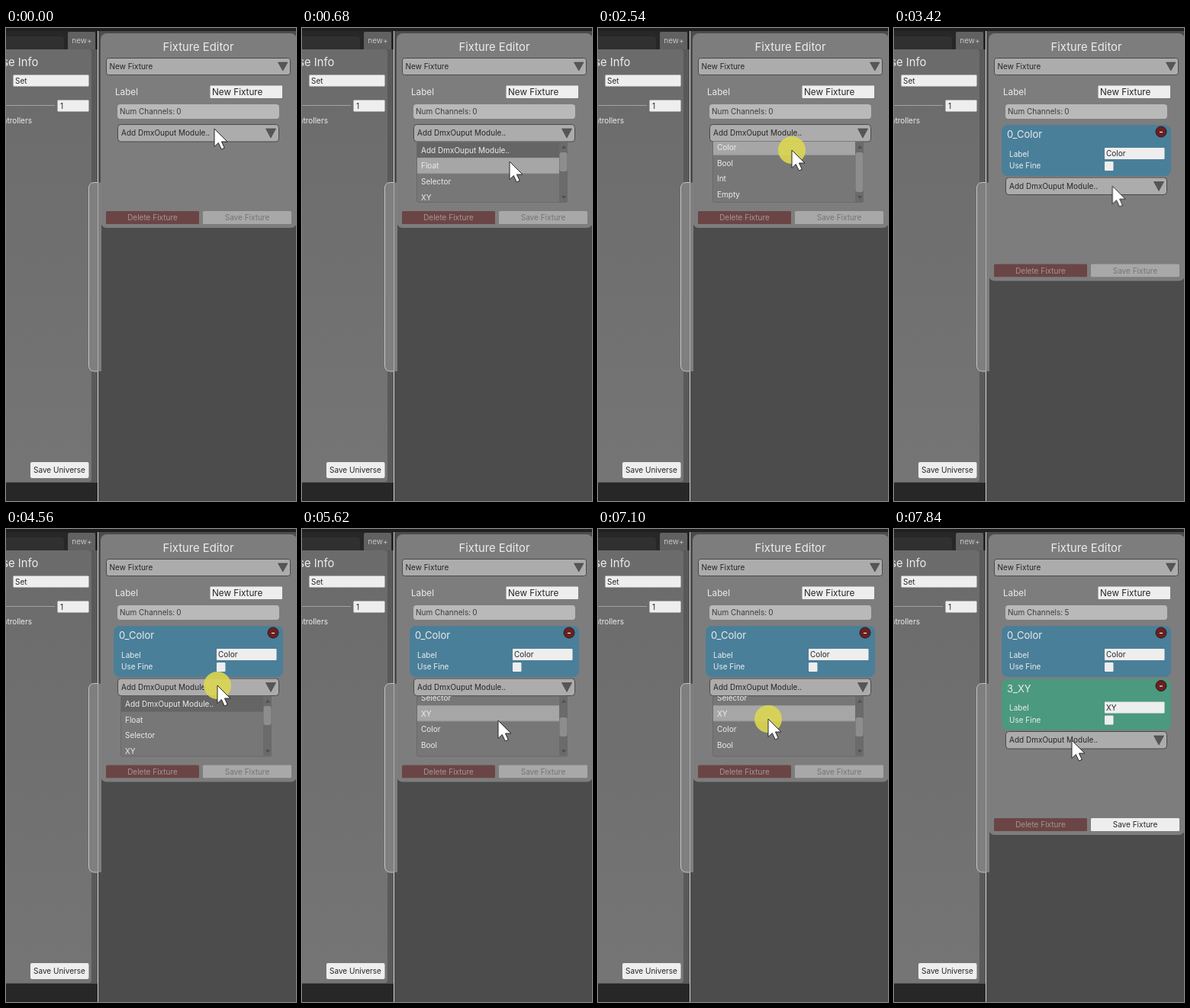
An HTML page that plays this animation: 380x620 px, repeating every 8 s.

```html
<!DOCTYPE html>
<html lang="en">
<head>
<meta charset="utf-8">
<title>Fixture editor</title>
<style>
html, body { margin: 0; width: 100%; height: 100%; overflow: hidden; background: #4c4c4c; }
svg { display: block; }
text { font: 10px Inter, Roboto, sans-serif; fill: #ececec; }
.h1 { font-size: 14.8px; }
.h2 { font-size: 13px; }
.big { font-size: 11.7px; }
.dark { fill: #262626; }
.mid { text-anchor: middle; }
.end { text-anchor: end; }
.field { fill: #eeeeee; }
.drop { fill: #acacac; stroke: #484848; }
.arrow { fill: #565656; stroke: #3f3f3f; stroke-width: .6; }

/* One loop is 8 s, so 1% is 80 ms. */
.anim { animation: 8s step-end infinite; }

#panel { animation-name: grow; }
@keyframes grow { 0% { height: 255px } 34.25% { height: 324.5px } 92.25% { height: 394px } }
#foot { animation-name: push; }
@keyframes push {
  0% { transform: translateY(0) }
  34.25% { transform: translateY(69.5px) }
  92.25% { transform: translateY(139px) }
}
#colorCard { animation-name: first; }
@keyframes first { 0% { opacity: 0 } 34.25% { opacity: 1 } }
.late { animation-name: second; }
@keyframes second { 0% { opacity: 0 } 92.25% { opacity: 1 } }
.early { animation-name: leave; }
@keyframes leave { 0% { opacity: 1 } 92.25% { opacity: 0 } }
#colorField { animation-name: tint; }
@keyframes tint { 0% { fill: #eee } 37.5% { fill: #dcdcdc } 39.8% { fill: #eee } }

#listA { animation-name: openA; }
@keyframes openA { 0% { opacity: 0 } .75% { opacity: .5 } 1.6% { opacity: 1 } 34.25% { opacity: 0 } }
#listB { animation-name: openB; }
@keyframes openB { 0% { opacity: 0 } 57% { opacity: 1 } 92.25% { opacity: 0 } }
#scrollA { animation-name: scrollA; }
@keyframes scrollA {
  0% { transform: translateY(0) }
  15% { transform: translateY(-43px) }
  16% { transform: translateY(-86px) }
}
#scrollB { animation-name: scrollB; }
@keyframes scrollB { 0% { transform: translateY(0) } 70.25% { transform: translateY(-49.5px) } }
#thumbA { animation-name: thumbA; }
@keyframes thumbA { 0% { height: 25px } 15% { height: 39px } 16% { height: 52px } }
#thumbB { animation-name: thumbB; }
@keyframes thumbB { 0% { transform: translateY(0) } 70.25% { transform: translateY(15px) } }

/* Highlighted row, in steps of one row height (20.6px). */
#hoverA { animation-name: hoverA; }
@keyframes hoverA {
  0% { transform: translateY(-30px) }
  6.8% { transform: translateY(0) }
  8.5% { transform: translateY(20.6px) }
  15% { transform: translateY(61.8px) }
  16% { transform: translateY(103px) }
  20.9% { transform: translateY(123.6px) }
  22.6% { transform: translateY(144.2px) }
  23.4% { transform: translateY(123.6px) }
  25.1% { transform: translateY(103px) }
  26.75% { transform: translateY(82.4px) }
}
#hoverB { animation-name: hoverB; }
@keyframes hoverB {
  0% { transform: translateY(-30px) }
  63.6% { transform: translateY(0) }
  66.2% { transform: translateY(20.6px) }
  70.25% { transform: translateY(61.8px) }
  77.8% { transform: translateY(82.4px) }
  79.6% { transform: translateY(103px) }
  82.1% { transform: translateY(82.4px) }
  85.5% { transform: translateY(61.8px) }
}

#cursor { animation-name: move; }
@keyframes move {
  0% { transform: translate(273px, 132px) }
  .75% { transform: translate(272px, 134px) }
  6% { transform: translate(272px, 134px); animation-timing-function: steps(3, jump-both) }
  8.5% { transform: translate(272px, 175px) }
  20% { transform: translate(264px, 193px); animation-timing-function: steps(3, end) }
  22.53% { transform: translate(257px, 213px); animation-timing-function: steps(5, end) }
  26.75% { transform: translate(252px, 163px) }
  28.5% { transform: translate(254px, 160px) }
  36.75% { transform: translate(254px, 160px); animation-timing-function: steps(2, jump-both) }
  38.5% { transform: translate(286px, 171px); animation-timing-function: steps(3, end) }
  41% { transform: translate(287px, 215px) }
  42.75% { transform: translate(287px, 215px); animation-timing-function: steps(4, jump-both) }
  46% { transform: translate(283px, 176px) }
  52% { transform: translate(283px, 176px); animation-timing-function: steps(2, jump-both) }
  53.5% { transform: translate(277px, 205px) }
  61% { transform: translate(277px, 205px); animation-timing-function: steps(7, jump-both) }
  67% { transform: translate(257px, 251px) }
  77% { transform: translate(257px, 251px); animation-timing-function: steps(4, jump-both) }
  80.4% { transform: translate(243px, 279px); animation-timing-function: steps(6, end) }
  85.5% { transform: translate(224px, 251px) }
  87.25% { transform: translate(223px, 249px) }
  95.5% { transform: translate(223px, 249px); animation-timing-function: steps(3, jump-both) }
  98%, 100% { transform: translate(233px, 277px) }
}
#click { animation-name: click; }
@keyframes click {
  0% { opacity: 0 }
  .75% { opacity: .9 } 3.25% { opacity: 0 }
  31.75% { opacity: .9 } 34.25% { opacity: 0 }
  57% { opacity: .9 } 58.5% { opacity: 0 }
  88.75% { opacity: .9 } 92.25% { opacity: 0 }
}
</style>
</head>
<body>
<svg width="380" height="620" viewBox="0 0 380 620">
  <defs>
    <linearGradient id="side" x2="0" y2="1">
      <stop stop-color="#6b6b6b"/><stop offset="1" stop-color="#757575"/>
    </linearGradient>
    <g id="rows">
      <text x="6" y="14.2">Add DmxOuput Module..</text>
      <text x="6" y="34.8">Float</text>
      <text x="6" y="55.4">Selector</text>
      <text x="6" y="76">XY</text>
      <text x="6" y="96.6">Color</text>
      <text x="6" y="117.2">Bool</text>
      <text x="6" y="137.8">Int</text>
      <text x="6" y="158.4">Empty</text>
    </g>
    <g id="box">
      <rect x=".5" y=".5" width="197" height="79" rx="2" fill="#777777" stroke="#6a6a6a"/>
      <rect x="187" y="1" width="11" height="78" fill="#6b6b6b"/>
      <path d="M190 9l3-4 3 4zM190 71l3 4 3-4z" fill="#4e4e4e"/>
    </g>
    <g id="cardParts">
      <text x="151" y="168.5">Label</text>
      <text x="151" y="184.3">Use Fine</text>
      <rect class="field" x="276" y="175" width="11.5" height="12" rx="1"/>
      <circle cx="350" cy="136" r="7" fill="#6b1f20" stroke="#2c1c1c"/>
      <path d="M348 136.5h4" stroke="#eeeeee" stroke-width="1.2"/>
    </g>
  </defs>

  <!-- Left side -->
  <rect width="380" height="620" fill="#4c4c4c"/>
  <rect width="120" height="620" fill="#272727"/>
  <rect x="-8" y="11" width="84" height="20" rx="4" fill="#303030"/>
  <rect x="81" y="5" width="36" height="26" rx="2" fill="#616161"/>
  <text x="99.5" y="19.5" class="mid" style="fill:#c4c4c4">new+</text>
  <rect y="28" width="120" height="568" fill="#595959"/>
  <rect x="-8" y="28" width="120" height="567" rx="4" fill="url(#side)"/>
  <text x="42.5" y="50" class="h1 end">Universe Info</text>
  <rect class="field" x="9.5" y="61.5" width="99" height="15" rx="1"/>
  <text x="12" y="72.6" class="dark">Set</text>
  <rect y="101" width="64" height="1" fill="#a2a2a2"/>
  <rect class="field" x="67.5" y="94.5" width="41" height="15" rx="1"/>
  <text x="71" y="105.8" class="dark">1</text>
  <text x="34" y="124.6" class="end">Controllers</text>
  <rect class="field" x="32" y="569" width="76.500" height="21" rx="2"/>
  <text x="70" y="583.2" class="dark mid">Save Universe</text>
  <rect width="380" height="4" fill="#211f20"/>
  <rect x="120" y="4" width="1" height="616" fill="#d8d8d8"/>

  <!-- Editor panel -->
  <rect id="panel" class="anim" x="124" y="7" width="257" height="255" rx="8" fill="#7d7d7d"/>
  <path d="M125 202.500H116Q108.500 202.500 108.500 210V442Q108.500 450 116 450H125z" fill="#7f7f7f"/>
  <path d="M121 202.500H116Q108.500 202.500 108.500 210V442Q108.500 450 116 450H121" fill="none" stroke="#c4c4c4"/>
  <path d="M120.500 203V450" stroke="#b0b0b0"/>
  <text x="252" y="30" class="h1 mid">Fixture Editor</text>
  <rect class="drop" x="131.500" y="39.500" width="241" height="22" rx="3"/>
  <text x="135.500" y="53.800" class="dark">New Fixture</text>
  <path class="arrow" d="M356.500 45h12.500l-6.250 11z"/>
  <text x="143" y="88.200" class="big">Label</text>
  <rect class="field" x="267.500" y="75.500" width="94.500" height="16.500" rx="1"/>
  <text x="270" y="88.100" class="big dark">New Fixture</text>
  <rect x="146" y="100" width="212" height="19" rx="4" fill="#b9b9b9"/>
  <text x="149" y="113" style="fill:#3c3c3c">Num Channels: <tspan class="anim early">
</tspan></text>
  <g class="anim early"><rect x="222" y="102" width="12" height="15" fill="#b9b9b9"/><text x="229.500" y="113" class="end" style="fill:#3c3c3c">0</text></g>
  <g class="anim late"><text x="229.500" y="113" class="end" style="fill:#3c3c3c">5</text></g>

  <!-- Module cards -->
  <g id="colorCard" class="anim">
    <rect x="141" y="127" width="222" height="67" rx="8" fill="#4a7f99"/>
    <text x="148" y="144.200" class="h2">0_Color</text>
    <use href="#cardParts"/>
    <rect id="colorField" class="anim" x="276" y="157" width="78.500" height="15" rx="1"/>
    <text x="278" y="168.300" class="dark">Color</text>
  </g>
  <g class="anim late">
    <g transform="translate(0 69.5)">
      <rect x="141" y="127" width="222" height="67" rx="8" fill="#4b997e"/>
      <text x="148" y="144.200" class="h2">3_XY</text>
      <use href="#cardParts"/>
      <rect class="field" x="276" y="157" width="78.500" height="15" rx="1"/>
      <text x="278" y="168.300" class="dark">XY</text>
    </g>
  </g>

  <!-- Parts pushed down by the cards -->
  <g id="foot" class="anim">
    <rect class="drop" x="146.500" y="126.500" width="211" height="22.500" rx="4"/>
    <text x="151" y="141.200" class="dark">Add DmxOuput Module..</text>
    <path class="arrow" d="M340.500 132h13l-6.500 12z"/>
    <rect x="131" y="240" width="122" height="17" rx="1.500" fill="#6b4545"/>
    <text x="192" y="252" class="mid" style="fill:#a69595">Delete Fixture</text>
    <rect x="258" y="240" width="116" height="17" rx="1.500" fill="#a8a8a8"/>
    <text x="316" y="252" class="mid anim early" style="fill:#747474">Save Fixture</text>
    <g class="anim late">
      <rect class="field" x="258" y="240" width="116" height="17" rx="1.500"/>
      <text x="316" y="252" class="mid dark">Save Fixture</text>
    </g>
  </g>

  <!-- Dropdown lists -->
  <g id="listA" class="anim">
    <use href="#box" x="150" y="149"/>
    <rect id="thumbA" class="anim" x="337.500" y="163" width="10" height="25" rx="3" fill="#8d8d8d"/>
    <svg x="151" y="149.500" width="186" height="78.500">
      <g id="scrollA" class="anim">
        <rect width="186" height="20.600" fill="#656565"/>
        <rect id="hoverA" class="anim" width="186" height="20.600" fill="#a6a6a6"/>
        <use href="#rows" x="-1"/>
      </g>
    </svg>
  </g>
  <g id="listB" class="anim">
    <use href="#box" x="150" y="218.500"/>
    <rect id="thumbB" class="anim" x="337.500" y="232" width="10" height="25" rx="3" fill="#8d8d8d"/>
    <svg x="151" y="219" width="186" height="78.500">
      <g id="scrollB" class="anim">
        <rect width="186" height="20.600" fill="#656565"/>
        <rect id="hoverB" class="anim" width="186" height="20.600" fill="#a6a6a6"/>
        <use href="#rows" x="-1"/>
      </g>
    </svg>
  </g>

  <g id="cursor" class="anim">
    <circle id="click" class="anim" r="18" fill="#dcd751"/>
    <path d="M0 0V23.500L5.300 18.500 9.300 27 13.300 25.200 9.500 17H17z" fill="#fff" stroke="#262626" stroke-linejoin="round"/>
  </g>
</svg>
</body>
</html>
```
